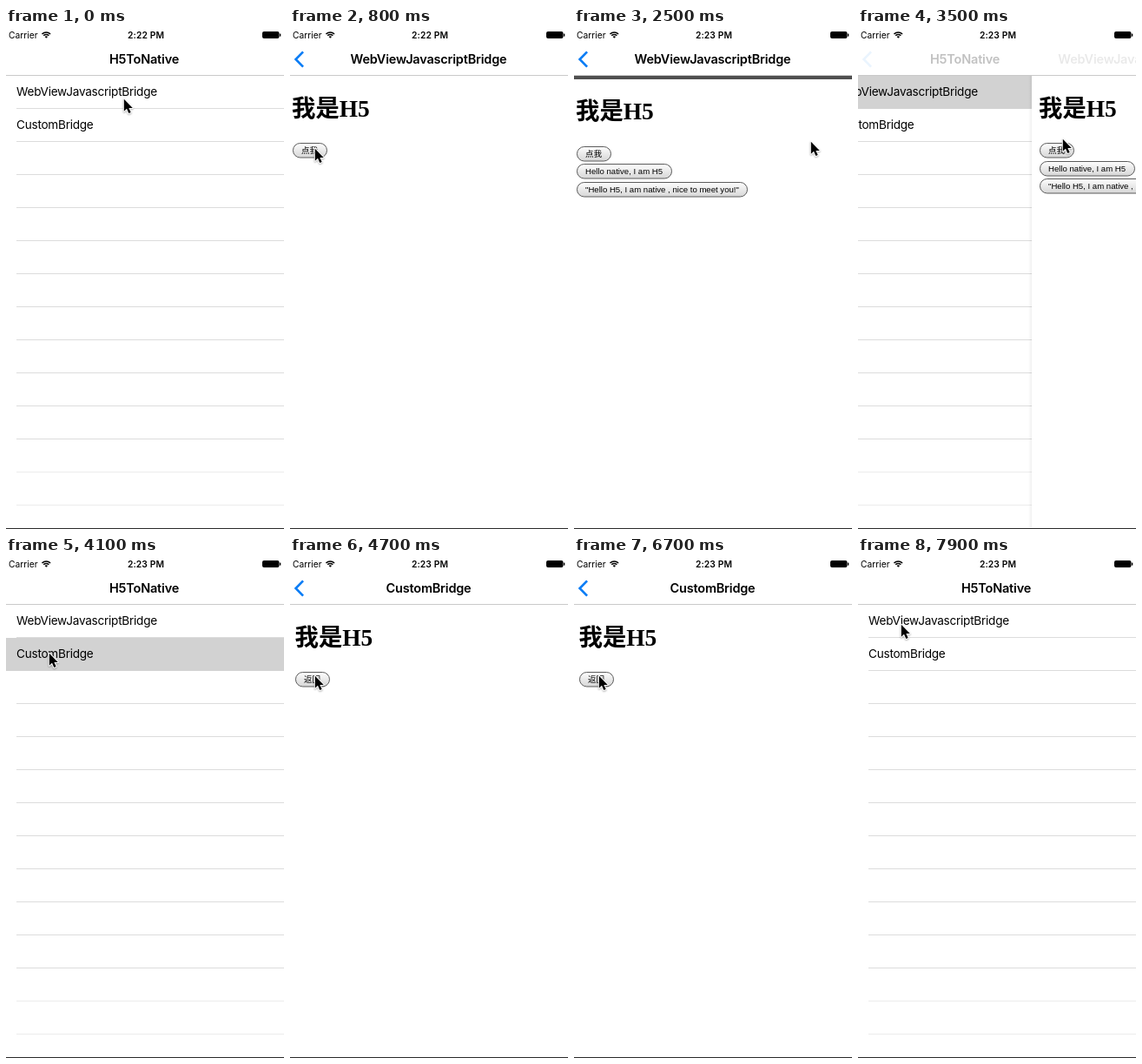
Recreate the animation shown at these times as an HTML page with a canvas. Size 320 by 576 pixels, loop 8 s.

```html
<!DOCTYPE html>
<html lang="en">
<head>
<meta charset="utf-8">
<title>H5ToNative</title>
<style>
  html, body { margin: 0; width: 100%; height: 100%; overflow: hidden; background: #fff; }
  canvas { display: block; width: 320px; height: 576px; }
</style>
</head>
<body>
<canvas id="stage"></canvas>
<script>
const W = 320, H = 576, LOOP = 8000, STEP = 100;
const canvas = document.getElementById('stage');
const ratio = window.devicePixelRatio || 1;
canvas.width = W * ratio;
canvas.height = H * ratio;
const c = canvas.getContext('2d');

const UI = 'Inter, "Open Sans", sans-serif';
const SANS = '"Liberation Sans", "Noto Sans CJK SC", sans-serif';
const SERIF = '"Liberation Serif", "Noto Sans CJK SC", serif';

const web = {
  title: 'WebViewJavascriptBridge', row: 0, travel: 257,
  buttons: ['点我', 'Hello native, I am H5', '"Hello H5, I am native , nice to meet you!"']
};
const custom = { title: 'CustomBridge', row: 1, travel: 217, buttons: ['返回'] };

// Navigation: start time, page, true for push and false for pop
const moves = [
  [100, web, true], [3394, web, false],
  [4100, custom, true], [5350, custom, false],
  [6250, custom, true], [7250, custom, false]
];

// Keyed values: time followed by the values at that time
const cursorKeys = [
  [0, 135, 81], [300, 135, 81], [800, 28, 138], [1700, 28, 138],
  [2300, 272, 125], [2500, 272, 130], [2600, 272, 130], [3200, 10, 128],
  [3300, 10, 128], [3400, 60, 127], [3500, 235, 127], [3600, 255, 125],
  [4000, 49, 110], [4200, 49, 110], [4700, 28, 136], [5400, 28, 136],
  [5900, 49, 109], [6300, 49, 109], [6700, 28, 136], [7300, 28, 136],
  [7900, 49, 77]
];
const scrollKeys = [[0, 0, 0], [2200, 0, 0], [2500, 0, 3.5], [2600, 0, 3.5], [2800, 6, 0]];

const clamp = v => Math.min(1, Math.max(0, v));

function keyed(keys, t) {
  const i = keys.findIndex(k => k[0] > t);
  if (i < 0) return keys[keys.length - 1].slice(1);
  const a = keys[i - 1], b = keys[i];
  const f = (t - a[0]) / (b[0] - a[0]);
  return a.slice(1).map((v, n) => v + (b[n + 1] - v) * f);
}

function text(str, x, y, font, { align = 'left', spacing = 0, color = '#000' } = {}) {
  c.font = font;
  c.letterSpacing = spacing + 'px';
  c.textAlign = align;
  c.fillStyle = color;
  c.fillText(str, x, y);
}

function rect(x, y, w, h, color) {
  c.fillStyle = color;
  c.fillRect(x, y, w, h);
}

function faded(alpha, draw) {
  c.save();
  c.globalAlpha = alpha;
  draw();
  c.restore();
}

function drawList(x, row, glow) {
  rect(0, 55, W, 520, '#fff');
  for (let i = 0; i < 13; i++) {
    rect(x + 12, 92 + 38 * i, W, 1, i > 10 ? '#ececec' : '#dcdcdc');
  }
  if (glow > 0) faded(glow, () => rect(0, 55 + 38 * row, W, 38, '#d2d2d2'));
  [web, custom].forEach((p, i) => {
    text(p.title, x + 12, 78 + 38 * i, '13.6px ' + UI, { spacing: -0.25 });
  });
}

function drawButton(label, x, y) {
  c.font = '9.6px ' + SANS;
  c.letterSpacing = '0px';
  const w = Math.floor(c.measureText(label).width + 20);
  const fill = c.createLinearGradient(0, y, 0, y + 17);
  fill.addColorStop(0, '#fff');
  fill.addColorStop(1, '#d6d6d6');
  c.beginPath();
  c.roundRect(x + 0.5, y + 0.5, w, 16.5, 8.25);
  c.fillStyle = fill;
  c.fill();
  c.strokeStyle = '#5c5c5c';
  c.lineWidth = 1;
  c.stroke();
  text(label, x + 10, y + 12.4, '9.6px ' + SANS);
}

function drawPage(page, left, t) {
  if (left > 0) {
    const shade = c.createLinearGradient(left - 4, 0, left, 0);
    shade.addColorStop(0, 'rgba(0,0,0,0)');
    shade.addColorStop(1, 'rgba(0,0,0,.06)');
    rect(left - 4, 55, 4, 520, shade);
  }
  rect(left, 55, W, 520, '#fff');
  const [dx, dy] = page === web ? keyed(scrollKeys, t) : [3.5, 0];
  text('我是H5', left + 2 + dx, Math.round(101.5 + dy), 'bold 27.4px ' + SERIF);
  const count = page === web && t < 1500 ? 1 : page.buttons.length;
  page.buttons.slice(0, count).forEach((label, i) => {
    drawButton(label, left + 3 + Math.floor(dx), Math.floor(132.5 + 20.7 * i + dy));
  });
  rect(left, 55, W, Math.round(dy), '#505050');
}

function drawStatus(t) {
  text('Carrier', 3, 12, '10.3px ' + UI);
  text(t < 1800 ? '2:22 PM' : '2:23 PM', 161, 12, '600 10.3px ' + UI, { align: 'center', spacing: 0.1 });

  c.strokeStyle = c.fillStyle = '#000';
  c.lineWidth = 1.5;
  for (const r of [4.3, 6.8]) {
    c.beginPath();
    c.arc(46.3, 11.8, r, -Math.PI * 0.75, -Math.PI * 0.25);
    c.stroke();
  }
  c.beginPath();
  c.moveTo(46.3, 11.8);
  c.arc(46.3, 11.8, 2.5, -Math.PI * 0.75, -Math.PI * 0.25);
  c.fill();

  c.beginPath();
  c.roundRect(295, 4, 19.5, 8, 2);
  c.fill();
  rect(315, 6.6, 1.3, 3, '#000');
}

function drawTitle(str, x) {
  text(str, x, 41, '600 14.5px ' + UI, { align: 'center', spacing: -0.19 });
}

function drawNav(page, p) {
  faded(p ** 3, () => drawTitle('H5ToNative', 159 - 96 * (1 - p)));
  if (!page) return;
  faded((1 - p) ** 2.5, () => {
    drawTitle(page.title, 159.5 + page.travel * p);
    c.strokeStyle = '#0a7cf5';
    c.lineWidth = 2.6;
    c.beginPath();
    c.moveTo(15.1, 27.3);
    c.lineTo(6.6, 36);
    c.lineTo(15.1, 44.7);
    c.stroke();
  });
}

const arrow = new Path2D('M0 0V14L3.2 11L5.5 16.2L7.9 15.2L5.6 10.1H10Z');

function drawCursor([x, y]) {
  c.save();
  c.translate(x + 0.8, y + 0.8);
  c.lineJoin = 'round';
  c.lineWidth = 2;
  c.strokeStyle = '#fff';
  c.shadowColor = 'rgba(0,0,0,.3)';
  c.shadowBlur = 2 * ratio;
  c.shadowOffsetY = ratio;
  c.stroke(arrow);
  c.shadowColor = 'transparent';
  c.fillStyle = '#000';
  c.fill(arrow);
  c.restore();
}

function draw(t) {
  c.setTransform(ratio, 0, 0, ratio, 0, 0);
  rect(0, 0, W, H, '#fff');

  const [start, page, push] = moves.filter(m => m[0] <= t).pop() || [-LOOP, null, false];
  const u = (t - start) / 50;
  const rest = (1 + u) * Math.exp(-u);   // critically damped spring
  const eased = rest < 0.004 ? 0 : rest;
  const p = push ? eased : 1 - eased;    // share of the list in view
  const glow = page ? (push ? 1 : clamp(1 - (t - start - 300) / 200)) : 0;

  if (p > 0) drawList(Math.round(-96 * (1 - p)), page ? page.row : 0, glow);
  rect(0, 54, W, 1, '#c9c9c9');
  if (page && p < 1) drawPage(page, Math.round(W * p), t);
  drawNav(page, p);
  drawStatus(t);
  rect(0, 575, W, 1, '#2a2a2a');
  drawCursor(keyed(cursorKeys, t).map(Math.round));
}

const origin = performance.now();
function tick() {
  const t = (performance.now() - origin) % LOOP;
  draw(Math.floor(t / STEP) * STEP);
  requestAnimationFrame(tick);
}
tick();
</script>
</body>
</html>
```
